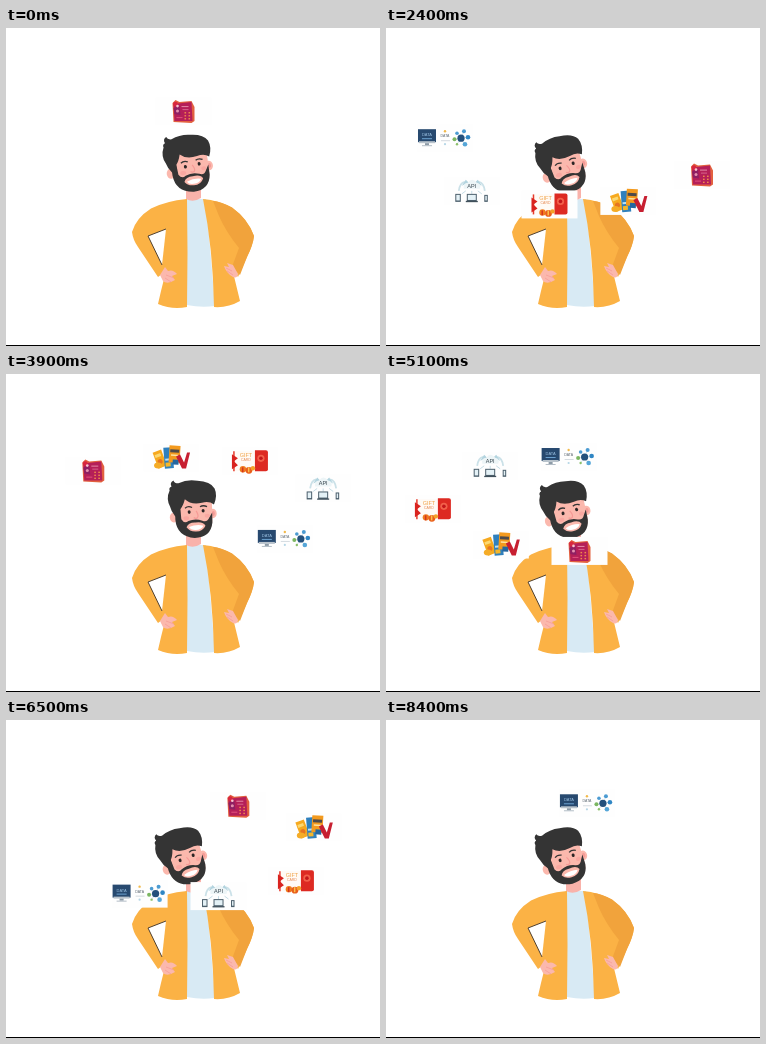
Recreate the animation shown at these times as an HTML page with a canvas. Size 374 px wide and 318 px high, loop 8500 ms.

```html
<!DOCTYPE html>
<html lang="en">
<head>
<meta charset="utf-8">
<title>Juggling offers</title>
<style>
  html, body { margin: 0; width: 100%; height: 100%; overflow: hidden; background: #fff; }
  canvas { display: block; width: 374px; height: 318px; filter: blur(0.45px); }
  .floor { position: absolute; left: 0; top: 317px; width: 374px; height: 1px; background: #000; }
</style>
</head>
<body>
<canvas id="stage"></canvas>
<div class="floor"></div>
<script>
const W = 374, H = 318, LOOP = 8500, STEP = 100;
const LAP = 3400, LIFE = 2 * LAP, GAP = 432;
const ORBIT = { x: 185.5, y: 130, rx: 139.5, ry: 47, lead: 8 };
const HAIR = '#343434', SKIN = '#fbb8ad', BLUSH = '#f59a96';
const COAT = '#fbb245', SHADE = '#f1a33c', SHIRT = '#d8eaf4';

const canvas = document.getElementById('stage');
const g = canvas.getContext('2d');
const dpr = window.devicePixelRatio || 1;
canvas.width = W * dpr;
canvas.height = H * dpr;

function shape(d, fill) {
  g.fillStyle = fill;
  g.fill(new Path2D(d));
}
function line(d, color, width) {
  g.strokeStyle = color;
  g.lineWidth = width;
  g.stroke(new Path2D(d));
}
function box(x, y, w, h, fill) {
  g.fillStyle = fill;
  g.fillRect(x, y, w, h);
}
function dot(x, y, r, fill, ry = r) {
  g.fillStyle = fill;
  g.beginPath();
  g.ellipse(x, y, r, ry, 0, 0, 7);
  g.fill();
}
function label(text, x, y, size, fill) {
  g.fillStyle = fill;
  g.font = `${size}px "Liberation Sans", sans-serif`;
  g.textAlign = 'center';
  g.fillText(text, x, y);
}
function at(x, y, angle, draw) {
  g.save();
  g.translate(x, y);
  g.rotate(angle);
  draw();
  g.restore();
}

// Arc length along the ellipse, anticlockwise from its top.
const N = 1440, arc = [0];
function onOrbit(a) {
  return [ORBIT.x - ORBIT.rx * Math.sin(a), ORBIT.y - ORBIT.ry * Math.cos(a)];
}
for (let i = 1; i <= N; i++) {
  const [x0, y0] = onOrbit((i - 1) / N * 2 * Math.PI);
  const [x1, y1] = onOrbit(i / N * 2 * Math.PI);
  arc.push(arc[i - 1] + Math.hypot(x1 - x0, y1 - y0));
}
function orbitAt(age) {
  const s = (ORBIT.lead + age / LAP * arc[N]) % arc[N];
  let lo = 0, hi = N;
  while (hi - lo > 1) {
    const mid = (lo + hi) >> 1;
    if (arc[mid] <= s) lo = mid; else hi = mid;
  }
  const part = (s - arc[lo]) / (arc[hi] - arc[lo]);
  return onOrbit((lo + part) / N * 2 * Math.PI);
}

function giftBox() {
  shape('M-11,-8L-8,-11L-4,-9L8,-10L10,-6L11,-4V10L8,12L-10,11Z', '#e2603f');
  shape('M-10,-7L8,-9L9,10L-9,10Z', '#b51f58');
  shape('M-10,-3L-4,-5L-3,4L-9,3Z', '#8e1f63');
  dot(-8, -7, 2.4, '#d8263f');
  dot(-6, -5, 1.3, '#f6c6d0');
  dot(-6, 0, 1.5, '#e58fac');
  box(-2, -5, 7, 1, '#e58aa6');
  box(-1, -2, 6, 1, '#d8628a');
  for (let i = 0; i < 6; i++) box(1 + (i % 2) * 4, 1 + (i >> 1) * 3, 1.6, 1.4, '#f08a4a');
  box(-7, 6, 6, 1, '#e0507c');
}

function voucherFan() {
  at(-11, 1, -0.35, () => {
    box(-5, -8, 9, 17, '#f6a91f');
    box(-4, -5, 6, 3, '#fbd872');
    dot(-1, 3, 2.5, '#e67522');
  });
  at(-3, 0, -0.08, () => {
    box(-4, -10, 9, 21, '#2f80bd');
    box(-3, 1, 6, 2, '#bfe0f0');
    box(-3, 5, 5, 4, '#f5b72b');
  });
  at(3, -3, 0.06, () => {
    box(-5, -9, 11, 17, '#f39a1e');
    box(-4, -5, 9, 3, '#4d4a4a');
    box(-3, 0, 7, 1.5, '#fde2a0');
    box(-1, 5, 6, 5, '#2466a0');
  });
  dot(-13, 8, 4, '#f5ac27', 3);
  shape('M5,-1L9,-3L13,5L16,-5L19,-5L15,11H11Z', '#c71f31');
}

function giftCard() {
  box(-17, -10, 30, 20, '#fffaf5');
  line('M-16,-10V10', '#e63a2c', 1.5);
  shape('M-18,-7L-12,-3L-16,0L-12,4L-18,8Z', '#d9231f');
  shape('M5,-11H16Q18,-11 18,-9V8Q18,10 16,10H5Z', '#dd2a22');
  dot(11, -3, 3.6, '#f2604a');
  dot(11, -3, 1.8, '#c3161a');
  label('GIFT', -4, -4, 5.5, '#f0a044');
  label('CARD', -4, 0, 3.5, '#e78a52');
  dot(-7, 8, 3.2, '#f07b1d');
  dot(-1, 9, 3.4, '#e95e1b');
  dot(3, 7, 2.2, '#f5a128');
  box(-8, 6, 1.5, 5, '#d5321d');
  box(-2, 6, 1.5, 5, '#fbc14a');
}

function apiCloud() {
  line('M-13,0Q-12,-8 -7,-9M13,0Q12,-8 7,-9', '#cbe1e8', 1.8);
  shape('M-10,-5L-6,-11L-3,-8ZM10,-5L6,-11L3,-8Z', '#b3d4df');
  shape('M-8,-2Q-9,-8 -4,-8Q0,-14 5,-8Q10,-7 8,-2Z', '#edf5f7');
  label('API', 0, -3, 5.5, '#34434c');
  line('M-6,0L-10,3M0,0V3M6,0L10,3', '#b7d4df', 0.8);
  const device = (x, y, w, h) => {
    box(x, y, w, h, '#4c5f6c');
    box(x + 1, y + 1, w - 2, h - 2.4, '#e4f1f6');
  };
  device(-16.5, 3, 5.5, 8);
  device(-5, 3, 10, 7.5);
  box(-6, 10, 12, 1.3, '#40505b');
  device(12.5, 4, 3.5, 7);
}

function dataHub() {
  box(-27, -9, 18, 13, '#27496f');
  box(-26, 3, 16, 2, '#b9c3cc');
  box(-20, 5, 4, 2, '#8d9ba7');
  box(-23, 7, 10, 1, '#b3bdc6');
  label('DATA', -18, -2, 4, '#9dc3e4');
  box(-23, 0, 10, 1, '#6ba0ce');
  label('DATA', 0, -1, 3.5, '#5b6670');
  dot(0, -7, 1.2, '#f2b94a');
  box(-4, 2, 9, 1, '#d5dbe0');
  dot(0, 6, 1.1, '#b5d6e6');
  const hub = [[9.5, 1, '#7bb661', 2], [12, -5, '#4b9bd2', 1.8], [19, -7, '#4b9bd2', 2],
    [23, -1, '#2f86c4', 2.3], [20, 6, '#55a6d8', 2.3], [12, 6, '#8cc06a', 1.2]];
  for (const [x, y, c, r] of hub) {
    line(`M16,0L${x},${y}`, '#bfd3df', 0.6);
    dot(x, y, r, c);
  }
  dot(16, 0, 3.6, '#24507c');
}

const items = [giftBox, voucherFan, giftCard, apiCloud, dataHub];

function body() {
  // shirt and neck
  shape('M179,171H200L209,278Q195,280 181,277Z', SHIRT);
  shape('M180,158H195V170Q187,175 180,171Z', '#f9b2aa');
  // left half of the coat, with its arm
  shape('M181,171Q160,173 145,180.5Q130,190 126,204Q127,212 132,219L152,249L160,243L155,263L152,276Q166,282 181,279Q182,225 181,171Z', COAT);
  shape('M142,208L160,201L156,237Z', '#fff');
  line('M160,201L142,208L156,237', '#51412f', 1);
  // right half
  const arm = 'Q213,172.5 226,179.5Q242,191 248,208Q247,217 241,229L';
  shape(`M197,171${arm}232,249L226,240L234,273Q222,280 208,279Q207,220 197,171Z`, COAT);
  shape(`M207,173${arm}234,247L226,239L233,220Q220,204 213,188Z`, SHADE);
  // hands
  shape('M154,247L159,239L162,243Q167,241 171,246L166,248L169,252Q161,257 157,253Z', SKIN);
  line('M160,247L168,250M159,250L165,254', BLUSH, 0.7);
  shape('M218,238L223,239L221,235L227,237L232,246Q231,251 227,249Q220,245 218,238Z', SKIN);
  line('M220,240L226,243M221,243L227,247', BLUSH, 0.7);
}

function head() {
  // ears
  dot(168.5, 143, 4, SKIN, 5);
  dot(207.5, 140, 4, SKIN, 4.8);
  dot(208, 140, 1.6, BLUSH, 2.4);
  // face and beard
  shape('M172,124H207V147Q206,162 190,163Q173,162 172,147Z', SKIN);
  shape('M170,131H175L176,145Q179,150 183,147Q190,144 197,147Q202,149 204,144L207,139L207,149Q205,164 189,164Q171,162 170,145Z', HAIR);
  shape('M181,153Q183,148 190,148.5Q198,147.5 200,152Q197,158 190,157.5Q184,157.5 181,153Z', SKIN);
  shape('M183.5,153Q191,150 198,152Q196,156 190,156Q185,156 183.5,153Z', '#fff');
  // features
  dot(181, 144, 3, '#f9a8a1', 2);
  dot(202, 142, 2.6, '#f9a8a1', 2);
  dot(184, 138, 1.5, '#2b2525', 1.8);
  dot(198, 137, 1.5, '#2b2525', 1.8);
  line('M180,134Q183,131.5 187,133.5M195,133Q198,131 202,133', HAIR, 1.3);
  line('M191,137Q194,142 192,144Q190,145 188.5,143.5', BLUSH, 1.2);
  // hair
  shape('M170,142Q166,137 165,132Q161,124 165,116Q164,113 167,112Q165,108 169,106Q170,109 174,109Q183,105 193,107Q206,108 210,115Q213,122 209,131Q204,127 197,129Q186,131 180,125Q178,132 175,135L175,142Z', HAIR);
}

function ease(x) {
  x = Math.min(1, Math.max(0, x));
  return x * x * (3 - 2 * x);
}
// Head sway: rests left, rises slowly to upright, drops back.
function tilt(t) {
  const p = (t % 2000) / 2000;
  const upright = p < 0.38 ? 1 - ease((p + 0.08) / 0.17) : p < 0.92
    ? ease((p - 0.38) / 0.46) : 1 - ease((p - 0.92) / 0.17);
  return (upright - 1) * 0.3;
}

function draw(t) {
  g.setTransform(dpr, 0, 0, dpr, 0, 0);
  box(0, 0, W, H, '#fff');
  body();
  at(187, 172, tilt(t), () => {
    g.translate(-187, -172);
    head();
  });
  items.forEach((item, i) => {
    const age = t - i * GAP;
    if (age < 0 || age >= LIFE) return;
    const [x, y] = orbitAt(age);
    at(x, y, 0, () => {
      box(-28, -14, 56, 28, '#fefefe');
      item();
    });
  });
}

const start = performance.now();
function frame() {
  const t = (performance.now() - start) % LOOP;
  draw(Math.floor(t / STEP) * STEP);
  requestAnimationFrame(frame);
}
frame();
</script>
</body>
</html>
```
